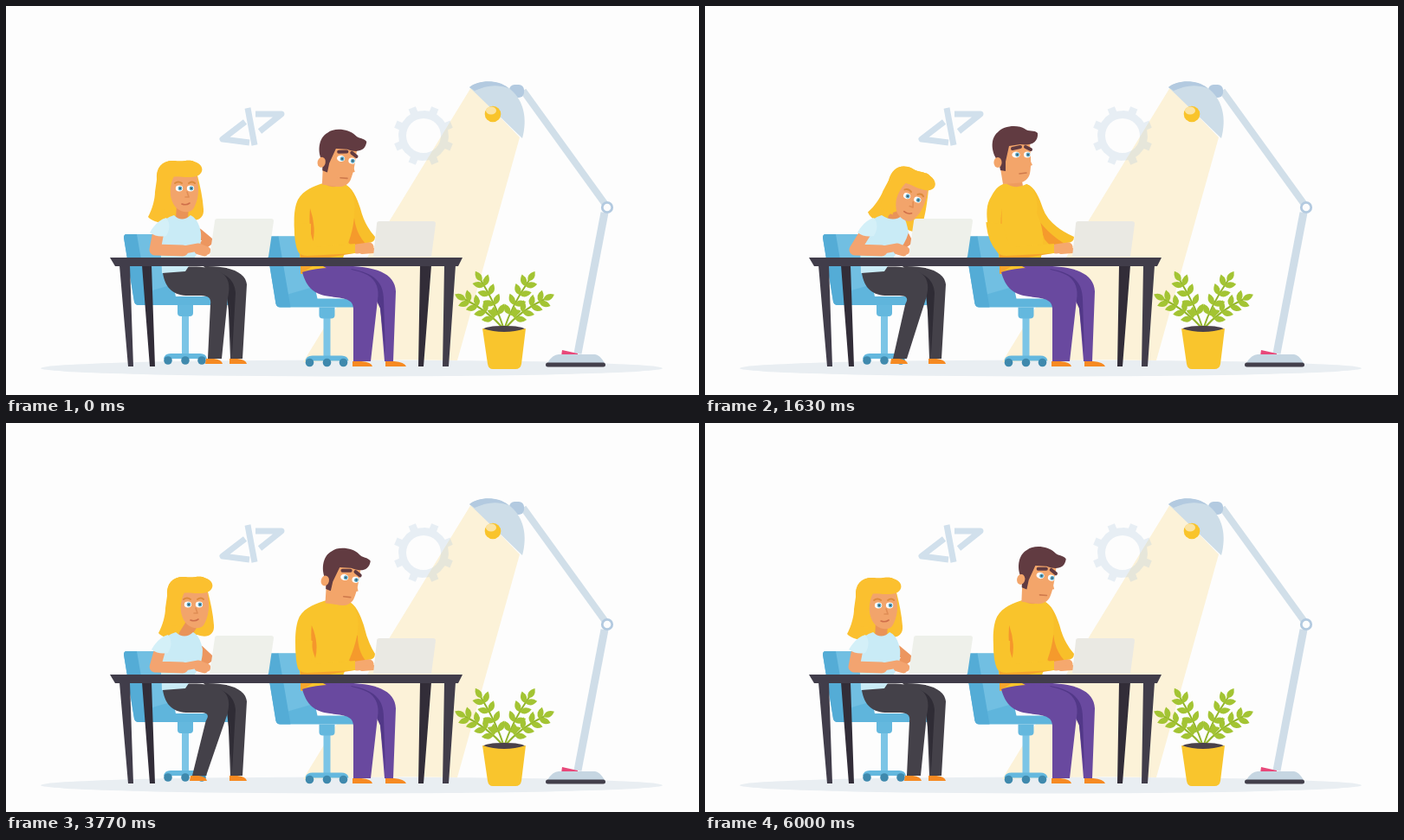
These frames come from a looping animation (800 by 450 pixels, 6030 ms). An HTML page:

```html
<!DOCTYPE html>
<html lang="en">
<head>
<meta charset="utf-8">
<title>Two people at a desk</title>
<style>
  html, body { margin: 0; width: 100%; height: 100%; overflow: hidden; background: #fdfdfd; }
  svg { display: block; width: 100vw; height: 100vh; }
  .line { fill: none; stroke-linecap: round; stroke-linejoin: round; }
</style>
</head>
<body>
<svg viewBox="0 0 800 450">
  <defs>
    <g id="chair">
      <path fill="#5fb5dc" d="M139 264H176Q180 264 181 268L196 336H258Q261 336 261 341T257 346H153Q149 346 148 342L136 268Q136 264 139 264Z"/>
      <path fill="#71bfe2" d="M150 264H176Q180 264 181 268L193 322L162 331Z"/>
      <path fill="#54acd6" d="M139 264H151L165 346H153Q149 346 148 342L136 268Q136 264 139 264Z"/>
      <path fill="#7cc5e6" d="M203 356H211V404H203Z"/>
      <path fill="#64b8de" d="M198 346H216V355Q216 359 212 359H202Q198 359 198 355Z"/>
      <path fill="#64b8de" d="M182 408Q183 402 190 402H224Q231 402 232 408Z"/>
      <g fill="#3f89ad"><circle cx="187" cy="410" r="4.8"/><circle cx="207" cy="410" r="4.8"/><circle cx="226" cy="410" r="4.8"/></g>
    </g>
  </defs>

  <ellipse cx="399" cy="419" rx="359" ry="9.5" fill="#e9eef2"/>
  <path fill="#fcf2d8" d="M537 94L343 412Q430 408 521 410L593 152Z"/>
  <g id="gear" fill="#b4cbdc" fill-opacity=".3"></g>
  <g fill="none" stroke="#d1e0ec" stroke-width="7" stroke-linejoin="round">
    <path d="M276 134L250 154L281 158M279 118L287 161M288 125H318L293 145"/>
  </g>

  <g id="lamp">
    <path d="M597 98L693 231" stroke="#d1dfe9" stroke-width="8"/>
    <path d="M691 239L660 402" stroke="#cfdde8" stroke-width="9"/>
    <rect x="581" y="91" width="17" height="15" rx="6" fill="#b3cae0"/>
    <path fill="#cddde8" d="M535 94C545 86 567 84 583 97C598 110 602 131 596 153Z"/>
    <path fill="#b3cae0" d="M535 94C545 86 567 84 580 95C566 90 554 92 541 98Z"/>
    <circle cx="562" cy="125" r="9.3" fill="#f9c42b"/>
    <ellipse cx="560" cy="121" rx="6" ry="4.5" fill="#fbe3a2"/>
    <circle cx="694" cy="233" r="5.7" fill="#fdfdfd" stroke="#b3cae0" stroke-width="2.8"/>
    <path fill="#e8487a" d="M642 398L660 402V405H641Z"/>
    <path fill="#c6d6e2" d="M638 403H680Q685 403 691 413H625Q631 403 638 403Z"/>
    <rect x="623" y="412.5" width="69" height="5" rx="2.5" fill="#423f4b"/>
  </g>

  <g id="plant"></g>
  <ellipse cx="575" cy="374" rx="24" ry="4" fill="#4a414a"/>
  <path fill="#f9c52d" d="M550 373Q575 381 600 373L595 414Q594 420 588 420H562Q557 420 556 414Z"/>

  <use href="#chair"/>
  <use href="#chair" transform="translate(163.5 2.5)"/>

  <g id="woman">
    <path fill="#444149" d="M228 301C260 300 277 309 278 322L273 408H259L256 330Z"/>
    <path fill="#2f2c35" d="M230 304C256 308 264 318 265 332L261 404L258 360L254 326Z"/>
    <path id="wLeg" fill="#444149"/>
    <path id="wShoe" fill="#f68a22"/>
    <path fill="#f68a22" d="M258 408H267Q277 409 278 414H258Z"/>
    <path id="wFarArm" class="line" stroke="#ec965f" stroke-width="10"/>
    <g id="wHairBack">
      <path fill="#fbc02f" d="M-33 -12C-34 -27 -26 -35 -12 -34C-4 -32 4 -36 10 -33C20 -30 21 -22 14 -17C17 -5 20 8 21 22C22 34 12 37 2 33L-10 35C-18 40 -36 39 -43 31C-38 22 -35 10 -35 2Z"/>
    </g>
    <path id="wNeck" class="line" stroke="#e99358" stroke-width="14"/>
    <path id="wShirt" fill="#c9ebf6"/>
    <path id="wArm" class="line" stroke="#f3a470" stroke-width="13"/>
    <path id="wHand" class="line" stroke="#f3a470" stroke-width="9"/>
    <path id="wSleeve" fill="#d4f0f8"/>
    <g id="wHead">
      <path fill="#f2a46b" d="M-18 -15L13 -18C17 0 15 12 9 22C5 27 -4 26 -10 21C-16 15 -19 5 -18 -15Z"/>
      <g id="wFace">
        <path class="line" stroke="#dc8a3c" stroke-width="2" d="M-12 -8Q-8 -11 -4 -8M4 -8Q8 -11 11 -8"/>
        <g fill="#fff"><ellipse cx="-7" cy="-2" rx="4.2" ry="3.4"/><ellipse cx="6" cy="-2" rx="4.2" ry="3.4"/></g>
        <g fill="#5aa6c4"><circle cx="-6" cy="-2" r="2.4"/><circle cx="7" cy="-2" r="2.4"/></g>
        <g fill="#35505f"><circle cx="-6" cy="-2" r="1"/><circle cx="7" cy="-2" r="1"/></g>
        <path class="line" stroke="#e08d55" stroke-width="1.6" d="M2 2L4 8H0"/>
        <path class="line" stroke="#cf6f4a" stroke-width="1.6" d="M-4 16Q1 18 5 15"/>
      </g>
      <path fill="#fbc02f" d="M-33 -12C-34 -27 -26 -35 -12 -34C-4 -32 4 -36 10 -33C21 -30 22 -21 15 -17C6 -13 -6 -16 -13 -16C-18 -8 -19 10 -15 24L-32 22Z"/>
    </g>
  </g>

  <g id="man">
    <path id="mNeck" class="line" stroke="#ee9c5f" stroke-width="18"/>
    <path id="mFarArm" fill="#f8bf2a"/>
    <path id="mFarShade" fill="#f59a2c"/>
    <path id="mBody" fill="#f9c42c"/>
    <path id="mFold" fill="#f5962c"/>
    <path id="mHem" fill="#f6a52c"/>
    <path class="line" stroke="#f5a86e" stroke-width="11" d="M405 281L419 279"/>
    <path class="line" stroke="#f5a86e" stroke-width="6" d="M411 284L424 283"/>
    <path id="mSleeve" fill="#f9c42c"/>
    <g id="mHead">
      <path fill="#f3a56a" d="M-17 -22H17C18 -8 19 4 17 14C15 22 8 25 0 25L-14 26L-17 8Z"/>
      <path fill="#f3a56a" d="M15 -6L20 4L15 6Z"/>
      <path fill="#613b41" d="M-19 0C-27 -8 -30 -26 -20 -34C-14 -42 4 -43 11 -38C16 -34 22 -37 26 -33C27 -22 18 -18 6 -20L-7 -18L-11 0V11L-17 10Z"/>
      <ellipse cx="-20" cy="1" rx="4.6" ry="6" fill="#f3a56a"/>
      <path class="line" stroke="#613b41" stroke-width="4" d="M-3 -15L6 -17M12 -17L18 -14"/>
      <g fill="#fff"><ellipse cx="1" cy="-8" rx="4.6" ry="3.6"/><ellipse cx="14" cy="-8" rx="4" ry="3.6"/></g>
      <g fill="#5aa6c4"><circle cx="2.5" cy="-8" r="2.4"/><circle cx="15" cy="-8" r="2.4"/></g>
      <g fill="#35505f"><circle cx="2.5" cy="-8" r="1"/><circle cx="15" cy="-8" r="1"/></g>
      <path class="line" stroke="#cf7a4c" stroke-width="1.6" d="M5 14L13 13"/>
    </g>
    <path fill="#69499f" d="M366 301C420 298 449 306 450 330L447 411H437L431 336Z"/>
    <path fill="#523888" d="M398 304C426 309 436 320 436 340L438 404L432 350L421 326Z"/>
    <path fill="#69499f" d="M342 308C365 300 400 302 417 311C428 317 431 328 429 340L421 411H401V350C401 337 385 338 374 336C356 334 347 326 342 308Z"/>
    <path fill="#f68a22" d="M400 411H410Q422 412 423 417H400ZM438 411H448Q460 412 462 417H438Z"/>
  </g>

  <path fill="#eef0ea" d="M244 246H306Q309 246 309 249L303 290H235L241 249Q241 246 244 246Z"/>
  <path fill="#eae9e3" d="M431 249H493Q496 249 496 252L491 290H424L428 252Q428 249 431 249Z"/>

  <g id="desk">
    <path fill="#322d38" d="M157 300H168L172 417H166ZM478 300H491L482 417H476Z"/>
    <path fill="#413d4a" d="M131 300H143L147 417H141ZM506 300H519L511 417H504ZM120 291H527L522 301H126Z"/>
  </g>
</svg>

<script>
const LOOP = 6030;
const el = id => document.getElementById(id);
const draw = (id, d) => el(id).setAttribute('d', d);
const place = (id, x, y, r = 0) =>
  el(id).setAttribute('transform', `translate(${x} ${y}) rotate(${r})`);

// time, woman: head x, y, turn, torso shift, face shift, ankle shift; man: head x, y, turn, lean
const poses = [
  [0,    207, 213, 0,  0,  0, 0,   384, 184, 12, 0],
  [630,  211, 216, 9,  -3, -1, -3, 370, 181, 3,  -9],
  [1630, 239, 224, 20, 10, 0, -16, 358, 180, 0,  -19],
  [3230, 229, 214, 3,  8,  2, -19, 360, 180, 1,  -17],
  [3770, 219, 212, 0,  2,  -2, -18, 388, 186, 13, 4],
  [5130, 220, 215, 5,  4,  3, -10, 395, 187, 11, 7],
];
const n = poses.length;
const pose = i => {
  const turn = Math.floor(i / n), p = poses[i - turn * n].slice();
  p[0] += turn * LOOP;
  return p;
};

// Smooth curve through the poses, level at turning points
function tangent(i, c) {
  const [a, b, d] = [pose(i - 1), pose(i), pose(i + 1)];
  const before = (b[c] - a[c]) / (b[0] - a[0]);
  const after = (d[c] - b[c]) / (d[0] - b[0]);
  return before * after <= 0 ? 0 : 2 * before * after / (before + after);
}
function sample(t) {
  let i = n - 1;
  while (poses[i][0] > t) i--;
  const a = pose(i), b = pose(i + 1), span = b[0] - a[0], u = (t - a[0]) / span;
  const h = u * u * (3 - 2 * u);
  return a.slice(1).map((v, k) => v + (b[k + 1] - v) * h
    + span * u * (1 - u) * ((1 - u) * tangent(i, k + 1) - u * tangent(i + 1, k + 1)));
}

function drawWoman(x, y, turn, s, face, a) {
  place('wHead', x, y, turn);
  place('wHairBack', x, y, turn);
  place('wFace', face, 0);
  const neck = 203 + s * 1.5;
  draw('wNeck', `M${x - 3 - turn * .35} ${y + 18}L${neck} 246`);
  draw('wShirt', `M180 309C180 290 176 272 ${177 + s} 256Q${180 + s} 246 ${194 + s} 242
    Q${neck} 251 ${neck + 10} 242Q${222 + s} 246 ${225 + s} 262Q${226 + s * .5} 276 221 286L207 307Z`);
  draw('wSleeve', `M${185 + s} 245Q${174 + s} 248 ${166 + s} 262Q${174 + s} 268 ${185 + s} 266Q${192 + s} 254 ${185 + s} 245Z`);
  draw('wArm', `M${176 + s} 261L${172 + s * .1} 282L204 283`);
  draw('wHand', `M200 283L222 279L232 283M222 283L229 285`);
  draw('wFarArm', `M${222 + s * .7} 262L234 272L222 281`);
  draw('wLeg', `M181 309C200 299 230 300 246 307C258 313 259 324 ${256 + a * .05} 338L${249 + a} 408H${233 + a}
    L${236 + a * .3} 345C238 333 226 335 214 335C195 336 184 328 181 309Z`);
  draw('wShoe', `M${231 + a} 408H${240 + a}Q${249 + a} 409 ${250 + a} 414H${230 + a}Z`);
}

function drawMan(x, y, turn, d) {
  const e = d * .45, fold = Math.max(0, 7 + d * .4);
  place('mHead', x, y, turn);
  draw('mNeck', `M${x - 5 - turn * .25} ${y + 14}L${377 + d} 208`);
  draw('mBody', `M341 310L339 287C${332 + e * .6} 268 ${330 + e} 238 ${337 + e} 224
    C${343 + e} 213 ${356 + d} 208 ${366 + d} 205Q${378 + d} 213 ${390 + d} 206
    C${399 + d} 209 ${404 + d} 222 ${402 + d} 240C${402 + e} 262 392 280 383 310Z`);
  draw('mFarArm', `M${390 + d} 206C${400 + d} 209 ${405 + d} 222 ${409 + d} 234Q${414 + d * .9} 254 426 267Q426 274 418 274L404 284H375L${390 + d} 244Z`);
  draw('mFarShade', `M${402 + d} 245Q${404 + e} 263 415 275L402 281L392 270Z`);
  draw('mFold', `M${351 + e} 234Q${351 + e + fold} 254 ${351 + e + fold * .5} 272Q${349 + e} 258 ${351 + e} 234Z`);
  draw('mHem', `M340 286H402Q370 291 366 293L340 310Z`);
  draw('mSleeve', `M${333 + e} 250Q${332 + e * .7} 272 337 284Q340 289 348 289L403 286V275L352 279L${352 + e} 252Z`);
}

function buildGear() {
  let d = '';
  const step = Math.PI / 4;
  for (let i = 0; i < 8; i++) {
    [[29, -.5], [29, -.23], [35, -.19], [35, .19], [29, .23]].forEach(([r, k]) => {
      const ang = (i + .5 + k * .85) * step;
      d += `${d ? 'L' : 'M'}${482 + r * Math.cos(ang)} ${150 + r * Math.sin(ang)}`;
    });
  }
  d += 'ZM502 150a20 20 0 1 0 -40 0a20 20 0 1 0 40 0Z';
  el('gear').innerHTML = `<path fill-rule="evenodd" d="${d}"/>`;
}

function buildPlant() {
  const stems = [[529, 339, 556, 352], [548, 317, 566, 346], [604, 317, 584, 346], [622, 339, 594, 352]];
  el('plant').innerHTML = stems.map(([x, y, cx, cy]) => {
    const at = u => [[575, cx, x], [374, cy, y]].map(([p, q, r]) =>
      (1 - u) ** 2 * p + 2 * u * (1 - u) * q + u * u * r);
    const leaf = (u, bend) => {
      const [px, py] = at(u), [qx, qy] = at(u - .04);
      const ang = Math.atan2(py - qy, px - qx) * 180 / Math.PI + bend;
      return `<path transform="translate(${px} ${py}) rotate(${ang})" d="M0 0Q6 -7 14 0Q6 7 0 0Z"/>`;
    };
    const leaves = [.3, .5, .7, .88].map(u => leaf(u, 48) + leaf(u, -48)).join('') + leaf(.97, 0);
    return `<path class="line" stroke="#93b52c" stroke-width="2" d="M575 374Q${cx} ${cy} ${x} ${y}"/><g fill="#a3c433">${leaves}</g>`;
  }).join('');
}

buildGear();
buildPlant();
const start = performance.now();
function frame(now) {
  const p = sample(Math.max(0, now - start) % LOOP);
  drawWoman(...p.slice(0, 6));
  drawMan(...p.slice(6));
  requestAnimationFrame(frame);
}
frame(start);
</script>
</body>
</html>
```
